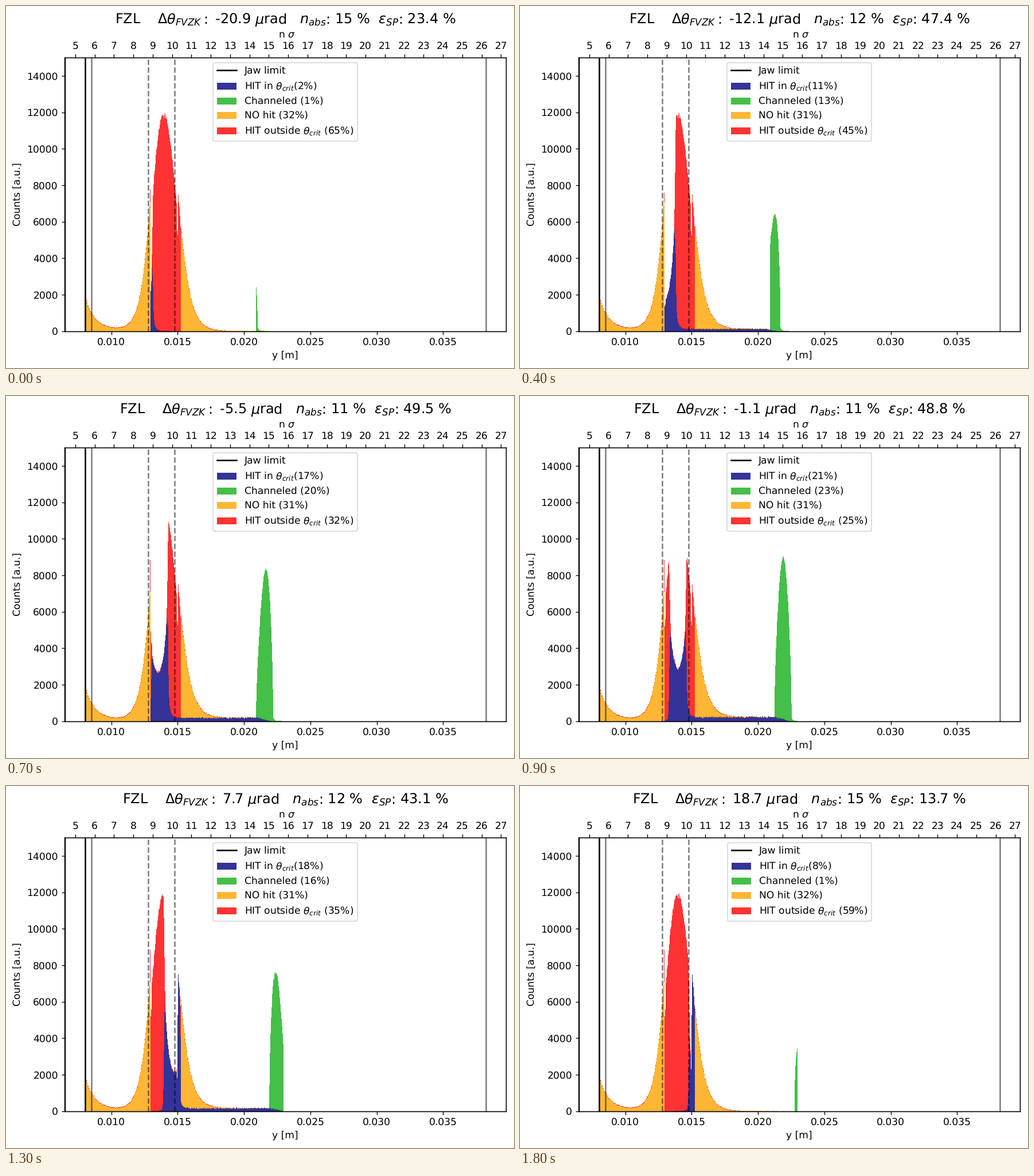
A matplotlib script that plays this animation: 886 px wide and 632 px high, repeating every 1.9 s.

```python
import numpy as np
import matplotlib.pyplot as plt
from matplotlib.animation import FuncAnimation
from matplotlib.patches import Patch

W, H, DPI = 886, 632, 120
LEFT, RIGHT, TOP, BOTTOM = 102.5, 872, 90, 567.5
N_FRAMES, INTERVAL = 19, 100
COLORS = ["navy", "xkcd:green", "orange", "red"]
ALPHA = 0.8

# Beam geometry in pixel columns
JAW, HIT_LO, BUMP, HIT_HI, PEAK = 138, 252, 300, 305, 275

# Key angles with channeled share, outside share and efficiency
KEYS = [
    (-20.9, 1, 65, 23.4), (-16.5, 5.7, 56, 41.5), (-9.9, 16, 39, 50.3),
    (-1.1, 23, 25, 48.8), (3.3, 23, 26, 48.4), (12.1, 10, 43.4, 37.9),
    (18.7, 1, 59, 13.7),
]
LABELS = [
    r"HIT in $\theta_{crit}$(%.0f%%)",
    "Channeled (%.0f%%)",
    "NO hit (%.0f%%)",
    r"HIT outside $\theta_{crit}$ (%.0f%%)",
]
TITLE = (r"FZL    $\Delta\theta_{FVZK}:$ %.1f $\mu$rad   "
         r"$n_{abs}$: %.0f %%  $\varepsilon_{SP}$: %.1f %%")

plt.rcParams.update({"font.size": 10.3, "text.hinting": "none",
                     "lines.linewidth": 1.55})


def to_y(col):
    return 0.010 + (col - 183.5) / 23160


def decay(dist, scale, power=1):
    """Falls from 1 with distance; zero on the other side."""
    return np.where(dist >= 0, np.exp(-scale * np.maximum(dist, 0) ** power), 0)


def grain(counts, noise):
    return np.maximum(counts + noise * np.sqrt(counts), 0)


edges = np.arange(JAW, 501)
cols = edges[:-1] + 0.5
rng = np.random.default_rng(4)
noise = rng.normal(0, 0.8, cols.size)
fringe = rng.uniform(0, 1, cols.size) ** 2
in_hit = (cols > HIT_LO) & (cols < HIT_HI)

# Particles that miss the crystal: jaw edge plus both flanks of the beam
halo = np.where(cols < HIT_LO, 60 + 1800 * decay(cols - JAW, 1 / 17), 0)
flanks = (7200 * decay(HIT_LO - cols, 0.047, 1.15)
          + 5700 * decay(cols - HIT_HI, 0.044, 1.13))
wings = grain(halo + flanks, noise)

# Particles that hit it: a skewed bell with a notch near each end
width = np.where(cols < PEAK, 20, 22)
bell = 11900 * np.exp(-0.5 * ((cols - PEAK) / width) ** 2)
bell[cols > BUMP] *= 1.22
bell[(cols < HIT_LO + 2) | ((cols > BUMP - 2) & (cols < BUMP))] *= 0.82
core = np.where(in_hit, grain(bell, noise), 0)
spike = np.where((cols > HIT_LO - 1) & (cols < HIT_LO), 1700, 0)


def readings(theta):
    """Shares of the four classes, absorbed share and efficiency."""
    angles, *rows = zip(*KEYS)
    green, red, efficiency = (np.interp(theta, angles, row) for row in rows)
    orange = 31 + (theta / 20) ** 2
    absorbed = 10.9 + 4.4 * ((theta + 1) / 20) ** 2
    blue = 100 - green - orange - red
    return [blue, green, orange, red], absorbed, efficiency


def layers(theta, channeled, seed):
    """Counts of the four classes for one crystal angle."""
    wobble = np.random.default_rng(seed).normal(0, 1, cols.size)

    # Window of the critical angle and the fraction left in it
    mid, half = 277.2 + 1.72 * theta, 14.6
    start, end = mid - half, mid + half
    u = np.abs(cols - mid) / half
    inside = 1 / (1 + np.exp(np.clip((u - 1) * half / 0.6, -50, 50)))
    left = np.minimum(0.24 + 0.27 * u ** 2 + 0.18 * u ** 8, 1)
    left[cols > BUMP - 1] = 1

    # Channeled peak
    center, reach = 460.7 + 1.755 * theta, 15
    lens = np.maximum(1 - ((cols - center) / reach) ** 2, 0) ** 0.6
    green = 8800 * np.exp(-0.5 * ((cols - 460) / 21.8) ** 2) * lens
    green = np.maximum(green, 350 * decay(cols - center - reach + 1, 0.55))
    green[(cols < 436) | (cols > 483.6)] = 0
    green = grain(green, 0.5 * wobble)

    # Dechanneled tail and the soft edges of the window
    tail_end = np.clip(center + 10, 449, 486)
    tail = 10 * (channeled - 1) * np.clip((tail_end - cols) / 22, 0, 1)
    tail = np.where(cols > max(end, HIT_LO), tail * (1 + 0.1 * wobble), 0)
    tail += 0.14 * np.interp(end, cols, core) * decay(cols - end, 0.31)
    tail += np.where(in_hit, 220 * decay(start - cols, 0.29), 0)

    red = (1 - inside) * core + spike * (1 - inside * (1 - left))
    red = np.maximum(red - np.where(in_hit, tail, 0), 0)
    red += fringe * (0.012 * wings + 120 * inside * in_hit)
    return [inside * left * core + tail, green, wings, red]


fig = plt.figure(figsize=(W / DPI, H / DPI), dpi=DPI)
ax = fig.add_axes([LEFT / W, 1 - BOTTOM / H, (RIGHT - LEFT) / W, (BOTTOM - TOP) / H])
ax.set_xlim(to_y(LEFT), to_y(RIGHT))
ax.set_ylim(0, 15000)
ax.set_xlabel("y [m]")
ax.set_ylabel("Counts [a.u.]")

bars = [ax.stairs(np.zeros(cols.size), to_y(edges), baseline=np.zeros(cols.size),
                  fill=True, color=c, alpha=ALPHA, lw=0, antialiased=False)
        for c in COLORS]

jaw = ax.axvline(to_y(137.5), color="k")
for col, style in [(149.3, "-"), (837, "-"), (248, "--"), (294.3, "--")]:
    ax.axvline(to_y(col), color="k", alpha=0.5, ls=style)

top = ax.twiny()
top.set_xlim(5 - (121 - LEFT) / 33.74, 5 + (RIGHT - 121) / 33.74)
top.set_xticks(range(5, 28))
top.set_xlabel(r" n $\sigma$")

title = fig.text((LEFT + RIGHT) / 2 / W, 1 - 31.5 / H, "", fontsize=14.4,
                 ha="center", va="baseline")
patches = [Patch(color=c, alpha=ALPHA, lw=0) for c in COLORS]
legend = ax.legend([jaw] + patches, ["Jaw limit"] + [s % 0 for s in LABELS],
                   loc="upper center")


def draw(i):
    theta = -20.9 + 2.2 * i
    shares, absorbed, efficiency = readings(theta)
    floor = np.zeros(cols.size)
    for bar, counts in zip(bars, layers(theta, shares[1], i)):
        bar.set_data(values=floor + counts, baseline=floor)
        floor = floor + counts
    for text, label, share in zip(legend.get_texts()[1:], LABELS, shares):
        text.set_text(label % share)
    title.set_text(TITLE % (theta, absorbed, efficiency))
    return bars + [title, legend]


anim = FuncAnimation(fig, draw, frames=N_FRAMES, interval=INTERVAL,
                     repeat=True, repeat_delay=0)
plt.show()
```
